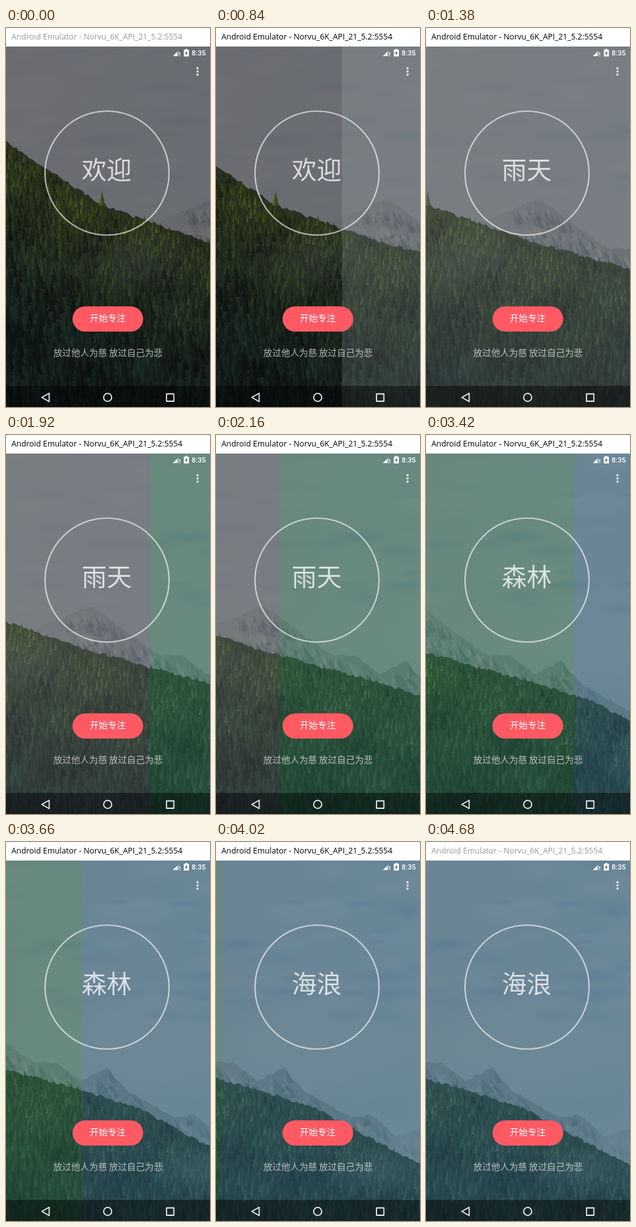
Animation, 319 px wide and 593 px high, one loop 4740 ms. Source, as an HTML page with a canvas:

```html
<!DOCTYPE html>
<html lang="zh-CN">
<head>
<meta charset="utf-8">
<title>专注</title>
<style>
  html, body { margin: 0; width: 100%; height: 100%; overflow: hidden; background: #fff; }
  #stage { position: absolute; left: 0; top: 0; width: 319px; height: 593px; overflow: hidden; }
  #stage > * { position: absolute; left: 0; top: 0; }
  #tints { display: flex; width: 1276px; height: 593px; }
  #tints div { width: 319px; height: 593px; }
  .cjk { font-family: "Noto Sans CJK SC", "Noto Sans CJK", sans-serif; text-anchor: middle; fill: #fff; }
</style>
</head>
<body>
<div id="stage">
  <canvas id="scene" width="770" height="593"></canvas>
  <div id="tints">
    <div style="background:rgba(20,22,26,.45)"></div>
    <div style="background:rgba(75,80,85,.55)"></div>
    <div style="background:rgba(48,100,78,.55)"></div>
    <div style="background:rgba(54,94,116,.55)"></div>
  </div>
  <svg width="319" height="593" viewBox="0 0 319 593">
    <rect width="319" height="29" fill="#fff"/>
    <text id="title" x="8.500" y="18" font-size="12.4" font-family="'Open Sans', 'Noto Sans', sans-serif">Android Emulator - Norvu_6K_API_21_5.2:5554</text>

    <g fill="#fff">
      <path d="M261 44 L270 35 V44 Z" fill-opacity=".45"/>
      <path d="M261 44 L267.5 37.5 V44 Z"/>
      <path d="M271 38 h1.3 v4 h-1.3 z M271 43 h1.3 v1.3 h-1.3 z"/>
      <path d="M278 34 h2.5 v-1.200 h3 v1.2 h2.5 v10.5 h-8 z"/>
      <path d="M283 35.5 l-3.3 4.3 h2 l-.8 3.4 3.4 -4.5 h-2 z" fill="#555"/>
      <text x="312.500" y="43" font-size="11.300" font-weight="500" text-anchor="end" font-family="Roboto, sans-serif">8:35</text>
      <g fill-opacity=".88">
        <circle cx="299.500" cy="63" r="1.800"/>
        <circle cx="299.500" cy="68" r="1.800"/>
        <circle cx="299.500" cy="73" r="1.800"/>
      </g>
    </g>

    <circle cx="158" cy="227" r="97" fill="none" stroke="#fff" stroke-opacity=".62" stroke-width="2.200"/>
    <text id="word" class="cjk" x="157.500" y="235.500" font-size="39" font-weight="200" fill-opacity=".75"></text>
    <rect x="104" y="435.500" width="110.500" height="39.500" rx="19.750" fill="#ff5a64"/>
    <text class="cjk" x="159" y="459" font-size="14">开始专注</text>
    <text class="cjk" x="159.500" y="513" font-size="14" font-weight="200" fill-opacity=".66">放过他人为慈 放过自己为悲</text>

    <rect y="560" width="319" height="33" fill="#000" fill-opacity=".45"/>
    <g fill="none" stroke="#fff" stroke-opacity=".9" stroke-width="1.800" stroke-linejoin="round">
      <path d="M56 578 L67.5 571.5 V584.5 Z"/>
      <circle cx="159" cy="578" r="6.300"/>
      <rect x="251" y="572.500" width="11.500" height="11.500"/>
    </g>
  </svg>
</div>
<script>
const W = 770, H = 593, PAGE = 319, SHIFT = 148;
const LOOP = 4740, TICK = 60;
const $ = id => document.getElementById(id);
const scene = $('scene'), ctx = scene.getContext('2d');

let seed = 41;
const rnd = () => {
  seed = (seed * 16807) % 2147483647;
  return seed / 2147483647;
};
const mix = (a, b, k) => a + (b - a) * k;
const clamp = v => Math.max(0, Math.min(1, v));
const rgb = (r, g, b, a = 1) => `rgba(${r | 0},${g | 0},${b | 0},${a})`;

const PEAKS = [[200, 318], [325, 267], [432, 345], [466, 345], [508, 374],
  [547, 353], [577, 388], [655, 432], [685, 427], [725, 462], [770, 446]];
const RIDGE = [[0, 178], [150, 277], [310, 333], [510, 389], [600, 418], [690, 468], [770, 510]];

function heightAt(line, x) {
  const i = Math.max(1, line.findIndex(p => p[0] >= x));
  const [[ax, ay], [bx, by]] = [line[i - 1], line[i]];
  return mix(ay, by, (x - ax) / (bx - ax));
}

function fillBelow(line, jag, paint) {
  const x0 = line[0][0];
  ctx.beginPath();
  ctx.moveTo(x0, H);
  for (let x = x0; x <= W; x += 4) ctx.lineTo(x, heightAt(line, x) + (rnd() - 0.5) * jag);
  ctx.lineTo(W, H);
  ctx.fillStyle = paint;
  ctx.fill();
}

function gradient(x, y, ...colors) {
  const g = ctx.createLinearGradient(0, 0, x, y);
  colors.forEach((c, i) => g.addColorStop(i / (colors.length - 1), c));
  return g;
}

function puff(x, y, rx, ry, r, g, b, a) {
  ctx.save();
  ctx.translate(x, y);
  ctx.scale(rx, ry);
  const fade = ctx.createRadialGradient(0, 0, 0, 0, 0, 1);
  fade.addColorStop(0, rgb(r, g, b, a));
  fade.addColorStop(0.5, rgb(r, g, b, a * 0.55));
  fade.addColorStop(1, rgb(r, g, b, 0));
  ctx.fillStyle = fade;
  ctx.fillRect(-1, -1, 2, 2);
  ctx.restore();
}

function drawSky() {
  ctx.fillStyle = gradient(W, 0, '#b2b4b9', '#aeb5bb', '#a9bac6');
  ctx.fillRect(0, 0, W, H);
  for (let i = 0; i < 90; i++) {
    const x = rnd() * W, y = 30 + rnd() * 250, size = 18 + rnd() * 40;
    if (i % 2) puff(x, y, size * 1.4, size * 0.5, 205, 205, 205, 0.15);
    else puff(x, y, size, size * 0.25, 105, 145, 180, 0.06 + 0.22 * x / W);
  }
  puff(620, 320, 260, 90, 190, 194, 196, 0.4);
}

function drawMountains() {
  ctx.save();
  fillBelow(PEAKS, 4, gradient(W, 0, '#a9abb0', '#a3a5a8', '#909b9f', '#8798a3'));
  ctx.clip();
  for (let i = 0; i < 420; i++) {
    const x = mix(270, W, rnd()), y = heightAt(PEAKS, x) + rnd() * 70;
    const s = 4 + rnd() * 10, dir = rnd() < 0.45 ? -1 : 1;
    ctx.fillStyle = dir < 0 ? 'rgba(200,200,192,.3)' : 'rgba(78,97,110,.32)';
    ctx.beginPath();
    ctx.moveTo(x, y);
    ctx.lineTo(x + s, y + s * 1.5);
    ctx.lineTo(x + dir * s * 0.3, y + s * 1.8);
    ctx.fill();
  }
  ctx.restore();
  puff(235, 305, 75, 40, 178, 180, 184, 0.7);
  puff(750, 470, 80, 40, 180, 188, 196, 0.7);
}

// sunlit yellow-green at upper left, blue-green lower down and to the right
function tree(x, y, h) {
  const depth = clamp((y - heightAt(RIDGE, x)) / 270);
  const cool = clamp((x - 150) / 420);
  const patch = 0.16 * Math.sin(x / 23 + y / 31) + 0.12 * Math.sin(y / 17 - x / 41);
  const lum = mix(1, 0.55, depth) * (0.5 + patch + rnd() * 0.75);
  const r = mix(mix(88, 54, cool), 34, depth) * lum;
  const g = mix(mix(104, 82, cool), 72, depth) * lum;
  const b = mix(mix(22, 52, cool), 58, depth) * lum;
  const w = h * 0.3;
  const half = (dir, shade) => {
    ctx.fillStyle = rgb(r * shade, g * shade, b * shade, 0.85);
    ctx.beginPath();
    ctx.moveTo(x, y - h);
    for (let k = 1; k <= 3; k++) {
      ctx.lineTo(x + dir * w * k / 3, y - h * (1 - k / 3));
      ctx.lineTo(x + dir * w * k / 5, y - h * (1 - k / 3));
    }
    ctx.lineTo(x, y);
    ctx.fill();
  };
  half(-1, 1.2);
  half(1, 0.7);
}

function drawForest() {
  fillBelow(RIDGE, 5, gradient(0, H, '#40502a', '#35482a', '#122a25'));
  tree(150, 278, 22);
  for (let d = 9; d < 430; d += 7) {
    const size = 12 + Math.min(d, 300) * 0.05;
    for (let x = rnd() * 8; x < W; x += size * (0.4 + rnd() * 0.4)) {
      const y = heightAt(RIDGE, x) + d + rnd() * 7;
      if (y < H + 20) tree(x, y, size * (0.7 + rnd() * 0.6));
    }
  }
  puff(205, 365, 110, 55, 150, 170, 175, 0.2);
  puff(700, 515, 100, 40, 130, 150, 160, 0.25);
}

drawSky();
drawMountains();
drawForest();

const WORDS = ['欢迎', '雨天', '森林', '海浪'];
const DRAG = 540;
const SWIPES = [
  { start: 600, share: 0.86, release: 1140, settle: 340 },
  { start: 1740, share: 0.883, release: 2280, settle: 600 },
  { start: 3240, share: 0.81, release: 3840, settle: 500 }
];

// even drag by the finger, then a decelerating snap to the page
function progress(t, { start, share, release, settle }) {
  const drag = clamp((t - start) / DRAG);
  const snap = 1 - (1 - clamp((t - release) / settle)) ** 5;
  return share * drag + (1 - share) * snap;
}

const began = performance.now();
function frame() {
  const now = (performance.now() - began) % LOOP;
  const t = Math.floor(now / TICK) * TICK;
  const pos = SWIPES.reduce((sum, s) => sum + progress(t, s), 0);
  const page = SWIPES.filter(s => t > s.release).length;
  scene.style.transform = `translateX(${-Math.round(pos * SHIFT)}px)`;
  $('tints').style.transform = `translateX(${-Math.round(pos * PAGE)}px)`;
  $('word').textContent = WORDS[page];
  $('title').setAttribute('fill', t < 480 || t >= 4680 ? '#999' : '#000');
  requestAnimationFrame(frame);
}
frame();
</script>
</body>
</html>
```
